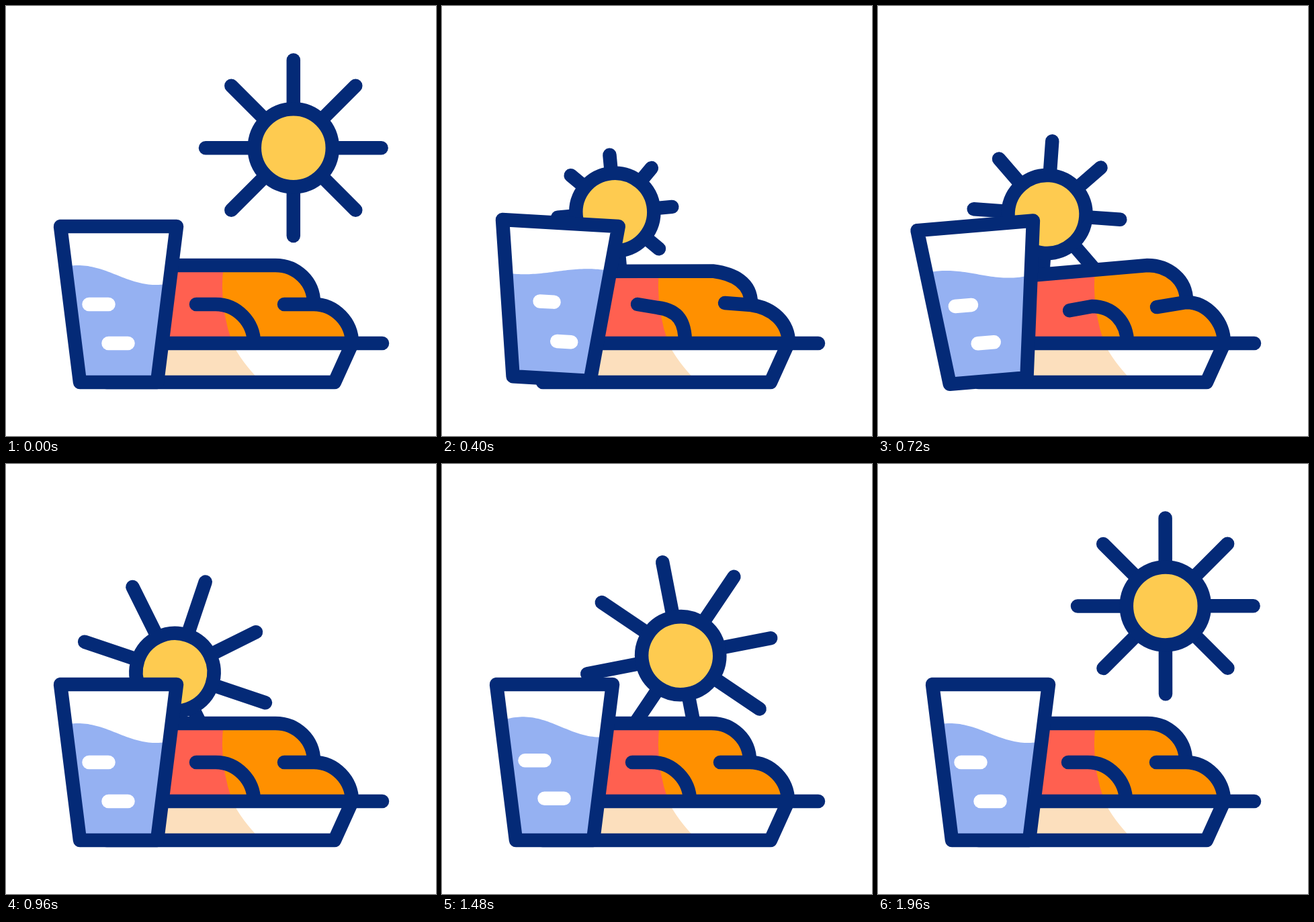
An HTML page with a canvas for the animation above (2 s loop, 640 by 640 pixels).

```html
<!DOCTYPE html>
<html lang="en">
<head>
<meta charset="utf-8">
<title>Lunch in the sun</title>
<style>
html, body { margin: 0; height: 100%; overflow: hidden; background: #fff; }
canvas { display: block; }
</style>
</head>
<body>
<canvas id="stage" width="640" height="640"></canvas>
<script>
const ctx = document.getElementById('stage').getContext('2d');
const LOOP = 2000;
const NAVY = '#042a77', SUN = '#fecb50', RED = '#ff6050', ORANGE = '#ff9000';
const CREAM = '#fcdfbd', WATER = '#95b1f2', WHITE = '#fff';

// Smooth 0 to 1 between two times, and a rise to a peak and back.
function ease(t, from, to) {
  const u = Math.min(1, Math.max(0, (t - from) / (to - from)));
  return u * u * (3 - 2 * u);
}
const bump = (t, from, peak, to) => ease(t, from, peak) - ease(t, peak, to);

// One coordinate of a cubic Bezier from 0 to 1.
const bezier = (q, c1, c2) =>
  3 * q * (1 - q) ** 2 * c1 + 3 * q * q * (1 - q) * c2 + q ** 3;

const line = (x0, y0, x1, y1) => new Path2D(`M${x0} ${y0}L${x1} ${y1}`);

function stroke(path, color = NAVY) {
  ctx.strokeStyle = color;
  ctx.stroke(path);
}

function fill(path, color) {
  ctx.fillStyle = color;
  ctx.fill(path);
}

function fillInside(mask, path, color) {
  ctx.save();
  ctx.clip(mask);
  fill(path, color);
  ctx.restore();
}

const turn = degrees => ctx.rotate(degrees * Math.PI / 180);

// The sun drops straight behind the glass, regrows its rays and rolls back up.
function drawSun(t) {
  const drop = ease(t, 0, 450), grow = ease(t, 450, 1080);
  const settle = ease(t, 1150, 1960), climb = ease(t, 1105, 1975);
  const reach = 130.8 - 47 * drop + 64 * grow - 17 * settle;

  ctx.save();
  ctx.translate(
    427.8 - 176.3 * (drop - bezier(climb, 0.55, 1)),
    211.3 + 98.7 * (drop - bezier(climb, 0.075, 0.54)));
  turn(-52 * drop + 28 * grow + 24 * ease(t, 900, 2000));
  for (let i = 0; i < 8; i++) {
    const lag = i === 0 ? 8 * (grow - settle) : 0;
    stroke(line(58, 0, reach - lag, 0));
    turn(45);
  }
  const disc = new Path2D();
  disc.arc(0, 0, 58, 0, 7);
  fill(disc, SUN);
  stroke(disc);
  ctx.restore();
}

const tray = new Path2D('M150 560H489L513 507');
const trayFill = new Path2D('M150 502H513L489 560H150Z');
const creamFill = new Path2D('M150 502H337Q349 528 380 560H150Z');
const redFill = new Path2D('M150 340H330L325 380Q315 440 337 502H150Z');

// A straight arm that bends down in a quarter round.
const hook = (start, [x, y], [endX, endY], sag) =>
  `${start}L${x} ${y}C${x + 31.5} ${y + sag} ${endX} ${endY - 31.5} ${endX} ${endY}`;

function drawFood(hit, rebound) {
  const a = hit, b = 1.7 * rebound, sag = 4 * a;
  const bend = [458 + 2 * a + b, 444 + a - 3 * b];
  const crust = hook([200, 386 + 9 * a + 17 * b], [401 + 2 * a, 386 + 8.5 * a],
    [bend[0], bend[1] - 2], sag);
  const loaf = hook([414 + 7 * a + b, 444 - 2 * a + 4 * b], bend, [515 + a, 502], sag);
  const bun = hook([283 + 8 * a + 2 * b, 444 + 9 * b],
    [312 + 9 * a + 6 * b, 444 + 5 * a + 3 * b], [369 - 7 * a + 2 * b, 502], sag);

  const body = new Path2D(`M200 502L${crust}L${loaf}Z`);
  fill(body, ORANGE);
  fillInside(body, redFill, RED);
  for (const part of [crust, loaf, bun]) stroke(new Path2D('M' + part));

  fill(trayFill, WHITE);
  fillInside(trayFill, creamFill, CREAM);
  stroke(tray);
  stroke(line(200, 502, 560, 502));
}

const glass = new Path2D('M81 328H254L225 560H110Z');

function drawGlass(t, hit, rebound) {
  const sink = bump(t, 960, 1280, 1600), swell = bump(t, 1280, 1640, 1960);

  ctx.save();
  ctx.translate(169 - 4.5 * hit - 5.6 * rebound, 560 - 5.3 * hit - 3.5 * rebound);
  turn(3.3 * hit - 8 * rebound);
  ctx.translate(-169, -560);
  fill(glass, WHITE);

  const level = 400.5 + 10.5 * sink - 21 * swell;
  const height = 14.5 - 21.5 * hit - 8 * rebound + 2 * sink;
  const middle = 165 + 22 * swell;
  const water = new Path2D('M260 570H80');
  for (let x = 80; x <= 260; x += 3) {
    water.lineTo(x, level + height * Math.sin(Math.PI * (x - middle) / 115));
  }
  fillInside(glass, water, WATER);

  const ice = (x, y, bob) => {
    const left = x + 20 * hit + 7 * rebound;
    const top = y + 2 * (hit + rebound) - bob * sink;
    stroke(line(left, top, left + 29 - 8 * (hit + rebound), top), WHITE);
  };
  ice(123.5, 444, 9);
  ice(152.5, 502, 14);
  stroke(glass);
  ctx.restore();
}

function draw() {
  const t = performance.now() % LOOP;
  const hit = bump(t, 200, 400, 560), rebound = bump(t, 400, 600, 880);
  ctx.fillStyle = WHITE;
  ctx.fillRect(0, 0, 640, 640);
  ctx.lineWidth = 20.5;
  ctx.lineCap = ctx.lineJoin = 'round';
  drawSun(t);
  drawFood(hit, rebound);
  drawGlass(t, hit, rebound);
  requestAnimationFrame(draw);
}
draw();
</script>
</body>
</html>
```
